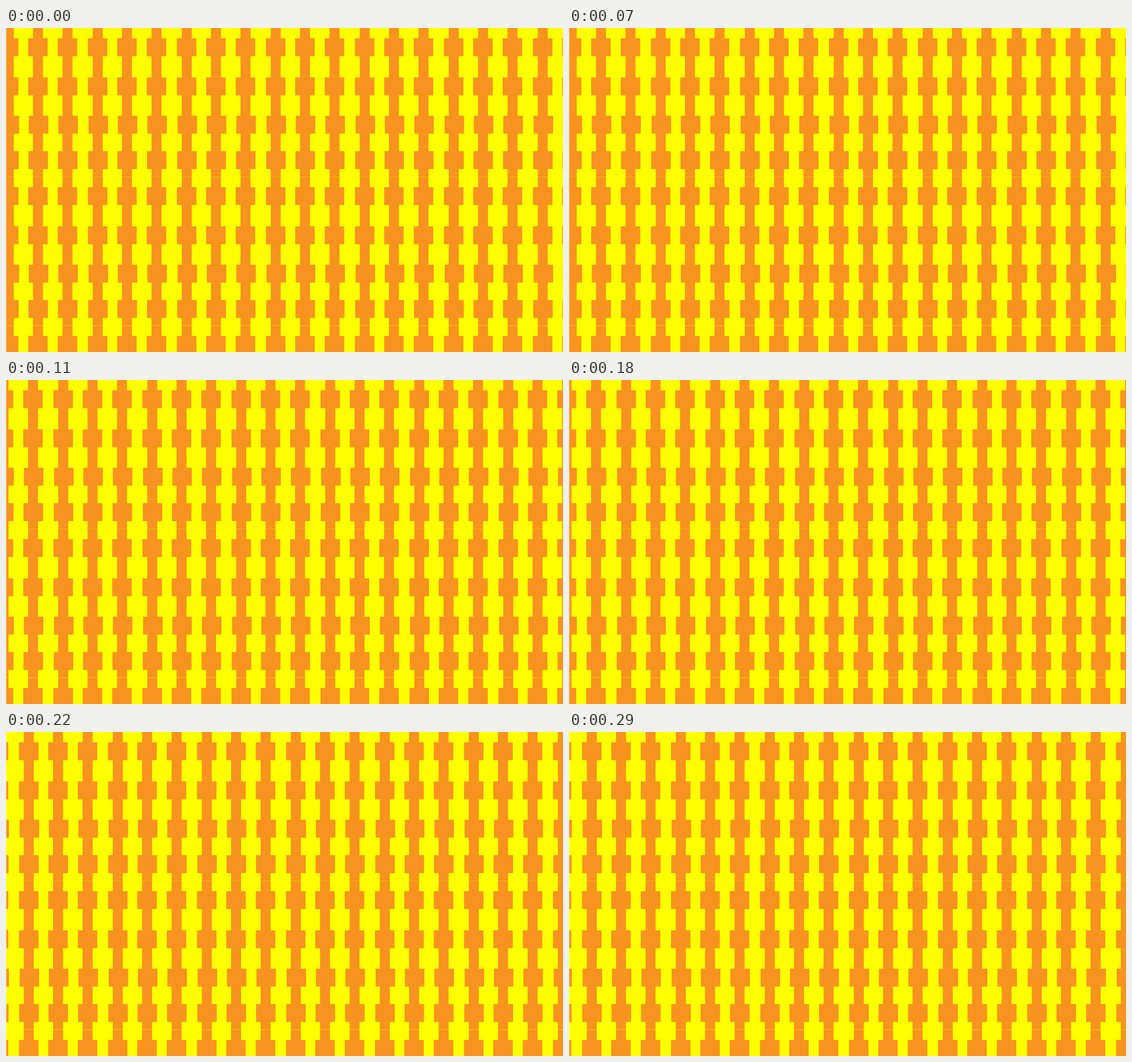
An HTML page with a canvas that plays this animation: 960x560 px, repeating every 330 ms.

```html
<!DOCTYPE html>
<html lang="en">
<head>
<meta charset="utf-8">
<title>Stepping stripes</title>
<style>
  html, body { margin: 0; width: 100%; height: 100%; overflow: hidden; background: #ff0; }
  canvas { display: block; }
</style>
</head>
<body>
<canvas id="stage" width="960" height="560"></canvas>
<script>
const W = 960, H = 560;
const STEP_MS = 110, STEPS = 3, SHIFT = -59.4;
const ORANGE = "#f7931e", YELLOW = "#ff0";

// One tile holds three stripes, each a thin bar carrying four blocks.
const TILE = { w: 153.4, h: 257.3 };
const BAR_W = 17.2, BLOCK_W = 33.6, BLOCK_H = 30.9, BLOCK_DX = -8.3;
const BARS = [97.4, 149.5, 199.9];
const BLOCKS = [
  { y: 17.8, dx: 0 },
  { y: 85.5, dx: 0 },
  { y: 151.7, dx: 1.1 },
  { y: 213, dx: 0.5 }
];

const ctx = document.getElementById("stage").getContext("2d");

function rect(color, x, y, w, h) {
  ctx.fillStyle = color;
  ctx.fillRect(x, y, w, h);
}

function stripe(x) {
  rect(ORANGE, x, 0, BAR_W, H);
  for (let top = 0; top < H; top += TILE.h) {
    for (const b of BLOCKS) {
      rect(ORANGE, x + BLOCK_DX + b.dx, top + b.y, BLOCK_W, BLOCK_H);
    }
  }
}

function draw(step) {
  rect(YELLOW, 0, 0, W, H);
  for (let left = step * SHIFT - 2 * TILE.w; left < W; left += TILE.w) {
    for (const bar of BARS) stripe(left + bar);
  }
  // Hairline seams where the tiles meet
  rect("rgba(255,255,0,.3)", 0, 257, W, 1);
  rect("rgba(255,255,0,.55)", 0, 514, W, 1);
  rect("rgba(255,255,255,.35)", 0, 0, 1, H);
}

const start = performance.now();
let shown = -1;

function tick() {
  const step = Math.floor((performance.now() - start) / STEP_MS) % STEPS;
  if (step !== shown) draw(shown = step);
  requestAnimationFrame(tick);
}
tick();
</script>
</body>
</html>
```
